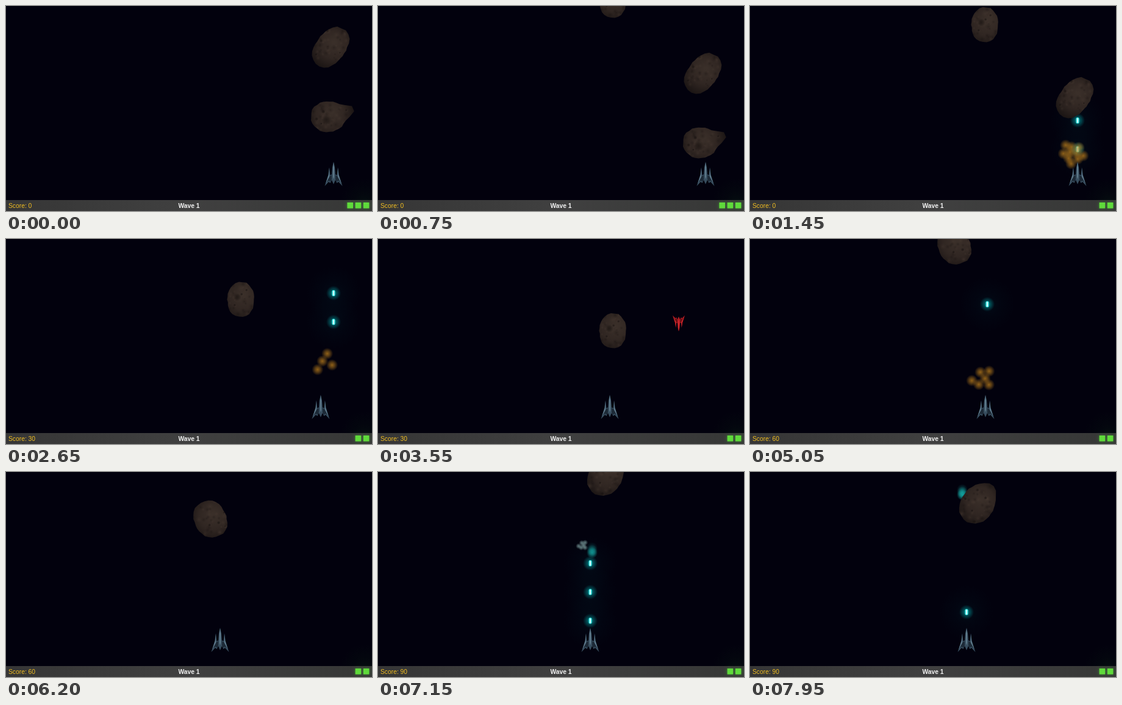
Recreate the animation shown at these times as an HTML page with a canvas. Size 600 px wide and 337 px high, loop 8000 ms.

```html
<!DOCTYPE html>
<html lang="en">
<head>
<meta charset="utf-8">
<title>Space shooter</title>
<style>
  html, body { margin: 0; width: 100%; height: 100%; overflow: hidden; background: #02010d; }
  canvas { display: block; width: 600px; height: 337px; }
</style>
</head>
<body>
<canvas id="stage" width="600" height="337"></canvas>
<script>
const ctx = document.getElementById('stage').getContext('2d');
const LOOP = 8000, STEP = 50;
const ROCK_SPEED = 0.0572, BULLET_SPEED = 0.57, SHIP_SPEED = 0.285, ENEMY_SPEED = 0.171;
const FIRE_GAP = 83, MUZZLE_Y = 256, START_X = 537;

// y: centre at time 0; a, b, tilt: rounded body; horn: [angle, length];
// hit: depth at which bullets stop; end: moment of destruction; blast: [puffs, dx, dy]
const rocks = [
  { x: 532, y: 68, a: 37, b: 24, tilt: -0.91, hit: 22, end: 2340, blast: [4, -9, 4] },
  { x: 528, y: 182, a: 28, b: 25, tilt: 0, horn: [-0.28, 17], pit: [-2, 5, 8], hit: 0, end: 1150, blast: [10, 0, -5], rammed: true },
  { x: 385, y: -52, a: 22, b: 29, tilt: 0, pit: [-6, -4, 6], hit: 0, end: 4772, blast: [6, -5, 10] },
  { x: 335, y: -277, a: 31, b: 26, tilt: 1.1, hit: 4, end: 7100, blast: [6, 0, -8] },
  { x: 373, y: -402, a: 34, b: 27, tilt: -0.96, horn: [-0.9, 6], hit: -14, end: LOOP, blast: [0, 0, 0] },
];

const moves = [[2576, 375], [3400, 380], [3640, 389], [4800, 386], [5150, 351], [6885, 348], [7560, 355]];
const volleys = [[1331, 2200], [2274, 2450], [3170, 3340], [3710, 4800], [6217, 7550], [7905, 7950]];

const clamp = (v, lo = 0, hi = 1) => Math.min(hi, Math.max(lo, v));
const rockY = (rock, t) => rock.y + ROCK_SPEED * t;

function shipX(t) {
  return moves.reduce((x, [start, target]) => {
    const reach = SHIP_SPEED * Math.max(0, t - start);
    return x + clamp(target - x, -reach, reach);
  }, START_X);
}

function random(seed) {
  return () => {
    seed = (seed * 16807) % 2147483647;
    return seed / 2147483647;
  };
}

function makeShot(at) {
  const shot = { at, x: shipX(at), hitAt: Infinity };
  for (const rock of rocks) {
    if (Math.abs(shot.x - rock.x) > 28) continue;
    const meet = at + (MUZZLE_Y - rockY(rock, at) - rock.hit) / (BULLET_SPEED + ROCK_SPEED);
    if (meet > at && meet <= rock.end) shot.hitAt = Math.min(shot.hitAt, meet);
  }
  return shot;
}

const shots = volleys.flatMap(([from, to]) =>
  Array.from({ length: Math.ceil((to - from) / FIRE_GAP) }, (_, i) => makeShot(from + i * FIRE_GAP)));
const shotY = (shot, t) => MUZZLE_Y - BULLET_SPEED * (t - shot.at);

function glow(x, y, r, rgb, alpha, middle = 0.4) {
  const g = ctx.createRadialGradient(x, y, 0, x, y, r);
  g.addColorStop(0, `rgba(${rgb},${alpha})`);
  g.addColorStop(0.45, `rgba(${rgb},${alpha * middle})`);
  g.addColorStop(1, `rgba(${rgb},0)`);
  ctx.fillStyle = g;
  ctx.fillRect(x - r, y - r, 2 * r, 2 * r);
}

function rockPath({ a, b, tilt, horn = [0, 0] }, next) {
  const corners = 30, power = 2.2;
  ctx.beginPath();
  for (let i = 0; i < corners; i++) {
    const angle = i / corners * 2 * Math.PI;
    const c = Math.abs(Math.cos(angle - tilt) / a), s = Math.abs(Math.sin(angle - tilt) / b);
    const turn = Math.atan2(Math.sin(angle - horn[0]), Math.cos(angle - horn[0]));
    const r = (c ** power + s ** power) ** (-1 / power) * (0.97 + 0.06 * next())
      + horn[1] * Math.exp(-((turn / 0.33) ** 2));
    ctx.lineTo(r * Math.cos(angle), r * Math.sin(angle));
  }
  ctx.closePath();
}

function drawPit(x, y, r) {
  glow(x + 1, y + 1, r * 1.4, '82,66,57', 0.28);
  glow(x, y, r * 1.1, '16,12,11', 0.6, 0.7);
}

function drawRock(rock, t, index) {
  const y = rockY(rock, t);
  if (t >= rock.end || y < -45) return;
  const next = random(911 + index * 377);
  const spot = () => (next() - 0.5) * 60;
  ctx.save();
  ctx.translate(rock.x, y);
  rockPath(rock, next);
  const shade = ctx.createRadialGradient(6, -8, 2, 3, -3, 40);
  shade.addColorStop(0, '#3a2f29');
  shade.addColorStop(0.55, '#302622');
  shade.addColorStop(1, '#1b1514');
  ctx.fillStyle = shade;
  ctx.fill();
  ctx.clip();
  for (let i = 0; i < 50; i++) {
    glow(spot(), spot(), 2 + next() * 4, i % 2 ? '14,10,10' : '80,64,55', 0.28);
  }
  for (let i = 0; i < 6; i++) drawPit(spot(), spot(), 1.5 + next() * 1.5);
  if (rock.pit) drawPit(...rock.pit);
  ctx.restore();
}

function polygon(color, ...points) {
  ctx.beginPath();
  points.forEach(([x, y]) => ctx.lineTo(x, y));
  ctx.closePath();
  ctx.fillStyle = color;
  ctx.fill();
}

// Nose at the origin, 40 long, both halves mirrored
function drawCraft(x, y, sx, sy, [dark, base, light]) {
  ctx.save();
  ctx.translate(x, y);
  for (const side of [-1, 1]) {
    ctx.save();
    ctx.scale(sx * side, sy);
    polygon(base, [0, 0], [2, 9], [3, 21], [5.5, 22], [7, 9], [8.8, 22], [14.5, 40], [8, 33], [5.5, 35], [3, 30], [0, 37]);
    polygon(dark, [3, 22], [8, 25], [11, 34], [8, 31], [5, 33], [3, 29]);
    polygon(light, [7, 10], [8, 21], [13, 36], [7, 25]);
    polygon(light, [0, 1], [1.2, 10], [1, 25], [0, 29]);
    ctx.restore();
  }
  ctx.restore();
}

function drawShot(shot, t) {
  const y = shotY(shot, t), x = shot.x;
  if (t >= shot.at && t < shot.hitAt && y > -45) {
    glow(x, y, 45, '0,80,90', 0.12);
    glow(x, y, 12, '0,200,200', 0.75, 0.45);
    ctx.fillStyle = '#35e8e4';
    ctx.beginPath();
    ctx.roundRect(x - 2.5, y - 5, 5, 10, 2);
    ctx.fill();
    ctx.fillStyle = '#d2ffff';
    ctx.fillRect(x - 1.2, y - 3.8, 2.4, 7.6);
  }
  const age = t - shot.hitAt;
  if (age >= 0 && age < 220) {
    glow(x, shotY(shot, shot.hitAt), 9, '20,175,170', 0.95 * (1 - age / 260), 0.7);
  }
}

function drawBlast(rock, t) {
  const age = t - rock.end;
  if (age < 0 || age > 750) return;
  const [count, dx, dy] = rock.blast;
  const grow = clamp(age / 190), heat = clamp((age - 50) / 90);
  const fade = 1 - clamp((age - 330) / 420);
  const mix = (cold, hot) => Math.round(cold + (hot - cold) * heat);
  const rgb = [mix(130, 190), mix(165, 128), mix(165, 28)].join();
  const spread = 19 * (0.15 + 0.85 * grow), size = 3 + 6.5 * grow;
  for (let i = 0; i < count; i++) {
    const angle = i * 2.4 + count, reach = spread * Math.sqrt((i + 0.5) / count);
    const x = rock.x + dx + reach * Math.cos(angle);
    const y = rockY(rock, rock.end) + dy + reach * Math.sin(angle);
    glow(x, y, size, rgb, 0.75 * fade, 0.6);
  }
}

function drawBar(t) {
  const gone = rocks.filter(rock => t >= rock.end);
  const crashes = gone.filter(rock => rock.rammed).length;
  const fill = ctx.createLinearGradient(0, 0, 600, 0);
  fill.addColorStop(0, '#363636');
  fill.addColorStop(0.5, '#404040');
  fill.addColorStop(1, '#363736');
  ctx.fillStyle = fill;
  ctx.fillRect(0, 319, 600, 18);
  ctx.font = '10.3px "Liberation Sans", Arial, sans-serif';
  ctx.textAlign = 'left';
  ctx.fillStyle = '#f0bd22';
  ctx.fillText('Score: ' + (gone.length - crashes) * 30, 4, 332);
  ctx.font = 'bold 10.3px "Liberation Sans", Arial, sans-serif';
  ctx.textAlign = 'center';
  ctx.fillStyle = '#f2f2f2';
  ctx.fillText('Wave 1', 300, 332);
  ctx.save();
  ctx.fillStyle = '#5fda3b';
  ctx.shadowColor = 'rgba(70,200,50,0.5)';
  ctx.shadowBlur = 5;
  for (let i = 0; i < 3 - crashes; i++) ctx.fillRect(585.8 - i * 13.2, 323, 9.6, 9.6);
  ctx.restore();
}

function draw(t) {
  ctx.fillStyle = '#02010d';
  ctx.fillRect(0, 0, 600, 337);
  glow(588, 322, 40, '20,80,30', 0.14);
  shots.forEach(shot => drawShot(shot, t));
  rocks.forEach((rock, i) => drawRock(rock, t, i));
  const enemyY = 152 + ENEMY_SPEED * (t - 3550);
  if (enemyY > 0 && enemyY < 350) {
    drawCraft(493, enemyY, 0.69, -0.66, ['#6e1016', '#b01c22', '#d62c30']);
  }
  rocks.forEach(rock => drawBlast(rock, t));
  drawCraft(shipX(t), MUZZLE_Y, 1, 1, ['#1d2a37', '#374d5e', '#5f7b8c']);
  drawBar(t);
}

function tick() {
  draw(Math.floor(performance.now() % LOOP / STEP) * STEP);
  requestAnimationFrame(tick);
}
tick();
</script>
</body>
</html>
```
